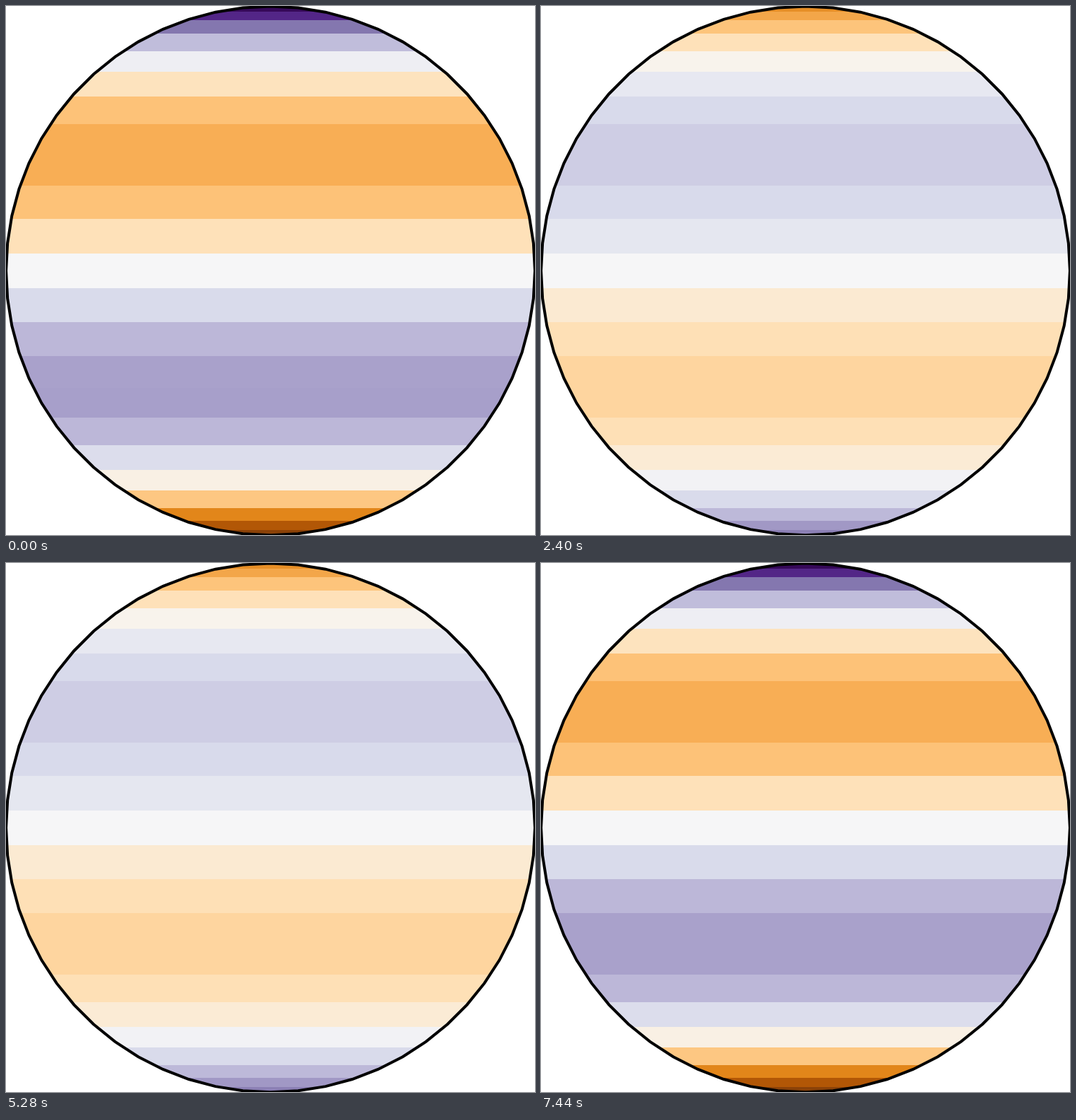
Recreate the animation shown at these times as an HTML page with a canvas. Size 748x748 px, loop 7.68 s.

```html
<!DOCTYPE html>
<html lang="en">
<head>
<meta charset="utf-8">
<title>Zonal harmonic on a sphere</title>
<style>
  html, body { margin: 0; width: 100%; height: 100%; overflow: hidden; background: #fff; }
  canvas { display: block; }
</style>
</head>
<body>
<canvas id="stage" width="748" height="748"></canvas>
<script>
const ctx = document.getElementById('stage').getContext('2d');
const CX = 374, CY = 374.4, RADIUS = 373.9;
const LOOP = 7680, STEP = 80, BAND = 7.5;
const rad = degrees => degrees * Math.PI / 180;

// Diverging orange-purple colour scale, evenly spaced over -1..1
const SCALE = ['7f3b08', 'b35806', 'e08214', 'fdb863', 'fee0b6', 'f7f7f7',
  'd8daeb', 'b2abd2', '8073ac', '542788', '2d004b']
  .map(hex => hex.match(/../g).map(part => parseInt(part, 16)));

// The scale is sampled at 256 levels
function colourOf(value) {
  const level = Math.max(0, Math.min(255, Math.floor((value + 1) * 128 + 1e-9)));
  const position = level / 255 * (SCALE.length - 1);
  const i = Math.min(Math.floor(position), SCALE.length - 2);
  const rgb = SCALE[i].map((c, k) => Math.round(c + (SCALE[i + 1][k] - c) * (position - i)));
  return `rgb(${rgb})`;
}

const cubicInOut = u => u < 0.5 ? 4 * u ** 3 : 1 - 4 * (1 - u) ** 3;

// Swings from 1 to -1 and back
function amplitude(time) {
  const u = time / (LOOP / 2);
  return 1 - 2 * cubicInOut(u < 1 ? u : 2 - u);
}

const legendre3 = x => (5 * x ** 3 - 3 * x) / 2;
const latitudeY = degrees => Math.round(CY - RADIUS * Math.sin(rad(degrees)));

const outline = new Path2D();
for (let angle = 0; angle < 360; angle += 6) {
  outline.lineTo(CX + RADIUS * Math.cos(rad(angle)), CY + RADIUS * Math.sin(rad(angle)));
}
outline.closePath();

function draw(time) {
  const strength = amplitude(time);
  ctx.fillStyle = '#fff';
  ctx.fillRect(0, 0, 748, 748);

  ctx.save();
  ctx.clip(outline);
  for (let latitude = 90; latitude >= -90; latitude -= BAND) {
    const top = latitudeY(Math.min(90, latitude + BAND / 2));
    const bottom = latitudeY(Math.max(-90, latitude - BAND / 2));
    ctx.fillStyle = colourOf(strength * legendre3(Math.sin(rad(latitude))));
    ctx.fillRect(0, top, 748, bottom - top);
  }
  ctx.restore();

  ctx.lineWidth = 4;
  ctx.strokeStyle = '#000';
  ctx.stroke(outline);
}

const start = performance.now();
function tick() {
  const time = (performance.now() - start) % LOOP;
  draw(Math.floor(time / STEP) * STEP);
  requestAnimationFrame(tick);
}
tick();
</script>
</body>
</html>
```
